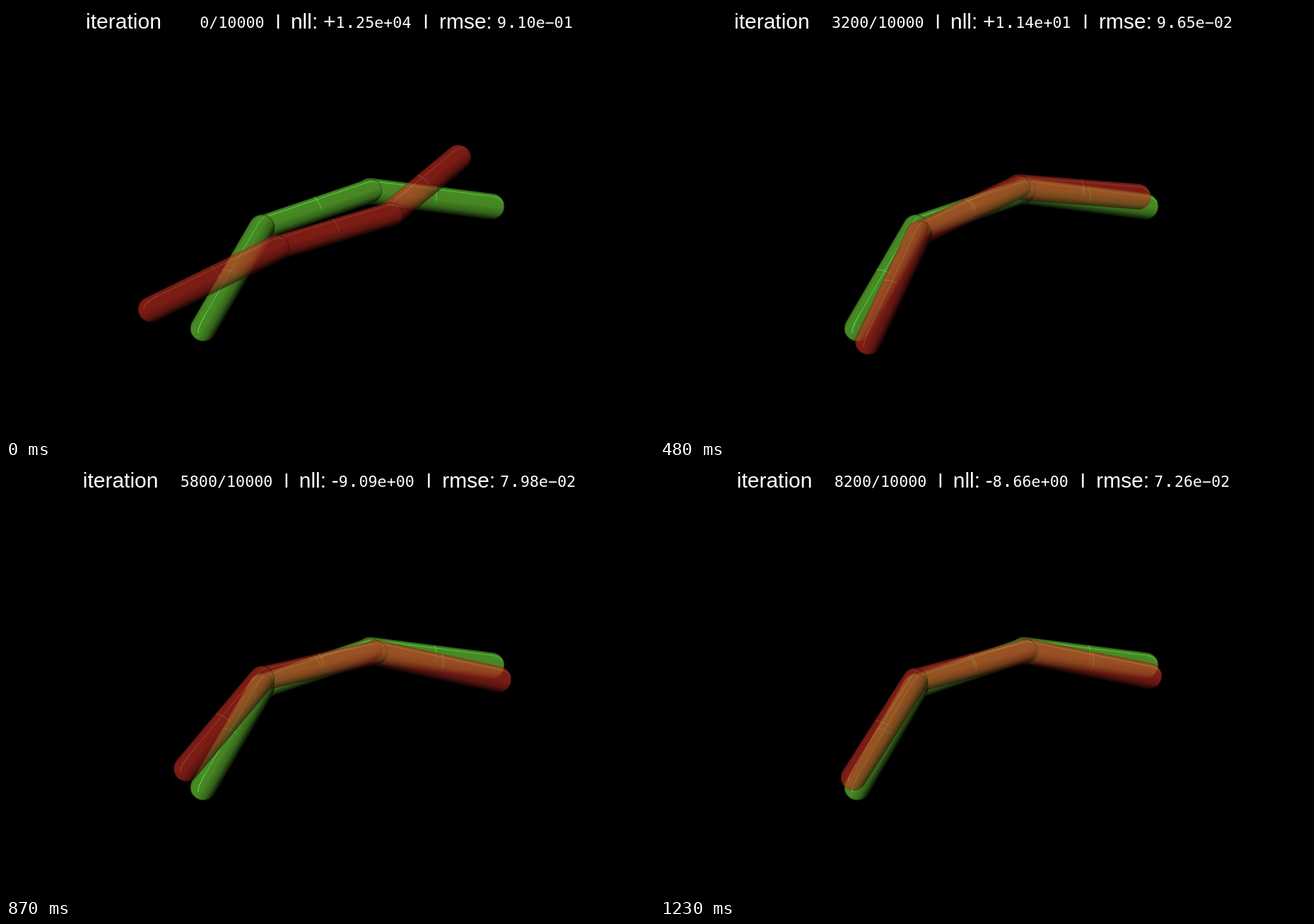
An HTML page with a canvas that plays this animation: 917 px wide and 611 px high, repeating every 2.26 s.

```html
<!DOCTYPE html>
<html>
<head>
<meta charset="utf-8">
<style>
html, body { margin: 0; width: 100%; height: 100%; overflow: hidden; background: #000; }
canvas { display: block; }
</style>
</head>
<body>
<canvas id="stage" width="917" height="611"></canvas>
<script>
const LOOP = 2260, TICK = 30, LAST = 41, RADIUS = 18.2;
const SANS = '30px "Liberation Sans", Arial, sans-serif';
const BAR = '28px "Liberation Sans", Arial, sans-serif';
const MONO = '21.7px "DejaVu Sans Mono", monospace';
const DOT = '26px "DejaVu Sans Mono", monospace';

const view = document.getElementById('stage').getContext('2d');
const layer = document.createElement('canvas');
layer.width = 917;
layer.height = 611;
const layerCtx = layer.getContext('2d');

const GREEN = { body: '#488a24', line: '#52e252' };
const RED = { body: '#d23024', line: '#ec7a54' };

const linear = u => u;
const late = u => u ** 5;
const overshoot = u => u + 0.58 * Math.sin(Math.PI * u);
const geometric = (a, b, u) => a * b > 0 ? a * (b / a) ** u : a + (b - a) * u;

// joints from left to right, and how the arm leaves each pose
const TRUTH = [279, 457, 362, 314, 515, 262, 687, 284];
const POSES = [
  { step: 0, ease: overshoot, joints: [205, 430, 383, 343, 544, 295, 640, 215] },
  { step: 5, ease: linear, joints: [319, 500, 368, 336, 501, 258, 662, 245] },
  { step: 12, ease: late, joints: [297, 479, 367, 324, 506, 256, 675, 268] },
  { step: 19, ease: late, joints: [255, 430, 362, 303, 523, 266, 697, 304] },
  { step: LAST, ease: linear, joints: [274, 443, 361, 306, 518, 264, 692, 299] }
];
const READINGS = [
  { step: 0, nll: 12500, rmse: 0.91 },
  { step: 5, nll: 260, rmse: 0.15 },
  { step: 12, nll: 37.6, rmse: 0.0909 },
  { step: 19, nll: 4.67, rmse: 0.101 },
  { step: 24, nll: -7.5, rmse: 0.0799 },
  { step: 33, nll: -10.6, rmse: 0.0797 },
  { step: LAST, nll: -8.66, rmse: 0.0726 }
];

// neighbouring keys around a step and the progress between them
function between(keys, step) {
  const i = Math.max(1, keys.findIndex(k => k.step >= step));
  const a = keys[i - 1], b = keys[i];
  return [a, b, (step - a.step) / (b.step - a.step)];
}

function link(c, skin, ax, ay, bx, by, r, isTip) {
  const len = Math.hypot(bx - ax, by - ay), turn = Math.atan2(by - ay, bx - ax);
  c.save();
  c.translate(ax, ay);
  c.rotate(turn);

  c.beginPath();
  c.arc(0, 0, r, Math.PI / 2, Math.PI * 1.5);
  c.arc(len, 0, r, -Math.PI / 2, Math.PI / 2);
  c.closePath();
  c.fillStyle = skin.body;
  c.fill();
  const shade = c.createLinearGradient(0, -r, 0, r);
  shade.addColorStop(0, 'rgba(0,0,0,.12)');
  shade.addColorStop(0.15, 'rgba(0,0,0,0)');
  shade.addColorStop(0.5, 'rgba(0,0,0,.03)');
  shade.addColorStop(0.78, 'rgba(0,0,0,.28)');
  shade.addColorStop(1, 'rgba(0,0,0,.82)');
  c.fillStyle = shade;
  c.fill();
  c.clip();
  c.strokeStyle = 'rgba(0,0,0,.4)';
  c.lineWidth = 2;
  c.stroke();

  // seam along the top
  const y = -0.78 * r * Math.cos(turn);
  c.strokeStyle = skin.line;
  c.lineWidth = 1.1;
  c.globalAlpha = 0.7;
  c.beginPath();
  c.moveTo(-r * 0.5, y * 0.4);
  c.quadraticCurveTo(-r * 0.2, y, r, y);
  if (isTip) c.stroke();
  c.lineTo(len, y);
  c.quadraticCurveTo(len + r * 0.6, y, len + r * 0.85, y * 0.5);
  c.stroke();

  // ring around the middle
  const ring = c.createLinearGradient(0, 0, 0, r);
  ring.addColorStop(0, skin.line);
  ring.addColorStop(1, 'transparent');
  c.strokeStyle = ring;
  c.beginPath();
  c.moveTo(len * 0.52, -r);
  c.quadraticCurveTo(len * 0.52 + 9, 0, len * 0.52, r);
  c.stroke();
  c.restore();
}

function arm(c, joints, skin) {
  for (let i = 2; i >= 0; i--) {
    const r = RADIUS - (i === 1 ? 1.2 : 0);
    link(c, skin, ...joints.slice(2 * i, 2 * i + 4), r, i === 0);
  }
}

function put(text, x, y, font) {
  view.font = font;
  view.fillText(text, x, y);
  return x + view.measureText(text).width;
}

function sci(value, x) {
  const [, lead, rest, sign, exp] = value.toExponential(2).match(/(\d)\.(\d+e)(.)(\d+)/);
  x = put(lead, x, 31, MONO);
  x = put('.', x, 31, DOT);
  put(rest + (sign === '-' ? '\u2212' : '+') + exp.padStart(2, '0'), x, 31, MONO);
}

// the line stays centred while padding and sign change its width
function caption(step, nll, rmse) {
  const count = String(step * 200), pad = 4 - count.length, neg = nll < 0;
  let x = 106 + 2.7 * pad + (neg ? 3.75 : 0);
  view.fillStyle = '#fff';
  put('iteration', x - 1, 32, SANS);
  put(count + '/10000', x + 137 + 7.7 * pad, 31, MONO);
  x -= 5.4 * pad;
  put('l', x + 284, 32, BAR);
  put('nll:', x + 305, 32, SANS);
  put(neg ? '-' : '+', x + 351, 32, SANS);
  if (neg) x -= 7.5;
  sci(Math.abs(nll), x + 368.5);
  put('l', x + 493, 32, BAR);
  put('rmse:', x + 515, 32, SANS);
  sci(rmse, x + 597);
}

function draw(now) {
  const step = Math.min(LAST, Math.floor((now % LOOP) / TICK));
  const [from, to, u] = between(POSES, step);
  const joints = from.joints.map((v, i) => v + (to.joints[i] - v) * from.ease(u));
  const [a, b, w] = between(READINGS, step);

  view.fillStyle = '#000';
  view.fillRect(0, 0, 917, 611);
  arm(view, TRUTH, GREEN);
  layerCtx.clearRect(0, 0, 917, 611);
  arm(layerCtx, joints, RED);
  view.globalAlpha = 0.6;
  view.drawImage(layer, 0, 0);
  view.globalAlpha = 1;
  caption(step, geometric(a.nll, b.nll, w), geometric(a.rmse, b.rmse, w));
}

let start;
function loop(now) {
  start ??= now;
  draw(now - start);
  requestAnimationFrame(loop);
}
draw(0);
requestAnimationFrame(loop);
</script>
</body>
</html>
```
